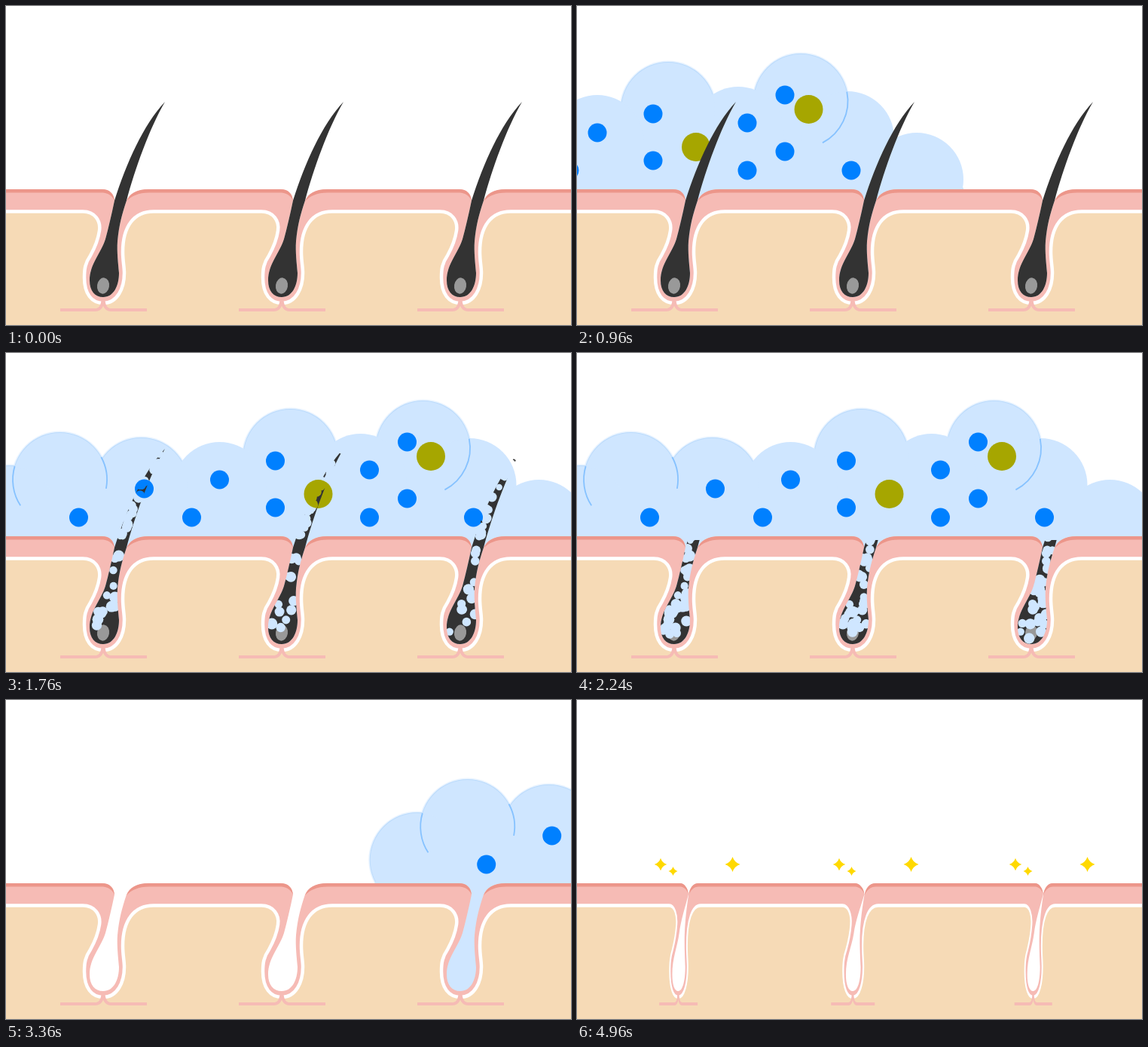
These frames come from a looping animation (750x423 px, 5.12 s). An HTML page with a canvas:

```html
<!DOCTYPE html>
<html lang="en">
<head>
<meta charset="utf-8">
<title>Hair removal foam</title>
<style>
  html, body { margin: 0; width: 100%; height: 100%; overflow: hidden; background: #fff; }
  canvas { display: block; width: 750px; height: 423px; }
</style>
</head>
<body>
<canvas id="stage" width="750" height="423"></canvas>
<script>
const W = 750, H = 423, STEP = 160, LOOP = 5120;
const ctx = document.getElementById('stage').getContext('2d');
const hairLayer = document.createElement('canvas');
hairLayer.width = W;
hairLayer.height = H;
const hctx = hairLayer.getContext('2d');

const PINK = '#f6bbb5', ROSE = '#ec968a', TAN = '#f6dab6';
const FOAM = '#cfe6ff', BLUE = '#0080ff', OLIVE = '#a6a600';
const SPACING = 237, ROOT = 129;

// How far each pore narrows and drifts when it closes; the tile ends at x1.
const pores = [
  { x: 0, squeeze: 0.443, drift: 5.4, x0: -5, x1: 248, stars: 0 },
  { x: SPACING, squeeze: 0.504, drift: 0, x0: 247, x1: 485, stars: 237 },
  { x: 2 * SPACING, squeeze: 0.435, drift: 2.5, x0: 484, x1: 755, stars: 471 }
];

// Foam lobes: x, y, radius, rimmed
const lobes = [
  [126, 126, 63, 1], [188, 175, 62, 0], [280, 230, 62, 0],
  [43, 168, 61, 0], [-50, 137, 63, 1], [-144, 180, 62, 0],
  [-248, 175, 63, 1], [-356, 168, 63, 1], [-423, 212, 63, 1]
];
const blueDots = [
  [105, 118], [55, 155], [105, 193], [55, 218], [193, 218], [-70, 143],
  [-70, 205], [-144, 168], [-181, 218], [-244, 180], [-331, 218]
];
const oliveDots = [[136.5, 137], [-13, 187]];
const creases = [
  [126, 126, -0.2, 1.09], [-356, 168, -0.5, 0.19],
  [-356, 168, Math.PI - 0.58, Math.PI + 0.29]
];

const clamp = v => Math.max(0, Math.min(1, v));

function disc(c, x, y, r, color) {
  c.fillStyle = color;
  c.beginPath();
  c.arc(x, y, r, 0, 2 * Math.PI);
  c.fill();
}

// Pore wall from the left lip round the bulb to the right lip.
function wall(k) {
  return `C${140 + 8 * k} 277 136 294 132 309 C126 328 111 342 111 364
    C111 378 118 386 129 386 C143 386 150 371 150 354
    C149 342 147 326 148 312 C150 290 154 276 160 258`;
}

const hairPath = new Path2D(
  `M211 127 C182 158 160 208 144 258 ${wall(0)} C171 217 190 163 211 127Z`);

function rng(seed) {
  return () => (seed = (seed * 16807) % 2147483647) / 2147483647;
}

// Bubbles that eat the hair: one set above the skin, one inside the pore.
pores.forEach((p, i) => {
  const rand = rng(7919 * (i + 3));
  p.upper = Array.from({ length: 60 }, () => {
    const u = rand();
    return [152 + 59 * u ** 1.35 + 8 * (rand() - 0.5), 250 - 123 * u, 4 + 3 * rand()];
  });
  p.lower = Array.from({ length: 70 }, () => {
    const v = rand() ** 0.75;
    const half = 7 + 10 * clamp((v - 0.4) * 3);
    return [153 - 24 * v ** 0.8 + half * (2 * rand() - 1), 254 + 128 * v, 5 + 2.5 * rand()];
  });
});

function foamShift(n) {
  return n < 16 ? -342 + 85.5 * Math.min(n, 9) : 427.5 + 90.2 * (n - 15);
}

function drawFoam(shift) {
  ctx.save();
  ctx.translate(shift, 0);
  const rimmed = lobes.filter(l => l[3]);
  rimmed.forEach(([x, y, r]) => disc(ctx, x, y, r + 1.5, '#e8f3ff'));
  rimmed.forEach(([x, y, r]) => disc(ctx, x, y, r, '#bbdbfc'));
  lobes.forEach(([x, y, r, rim]) => disc(ctx, x, y, rim ? r - 1 : r, FOAM));
  ctx.fillRect(-479, 241, 821, 154);
  ctx.fillRect(-420, 180, 700, 70);
  ctx.strokeStyle = '#86c2ff';
  ctx.lineWidth = 1.8;
  creases.forEach(([x, y, a, b]) => {
    ctx.beginPath();
    ctx.arc(x, y, 62.5, a, b);
    ctx.stroke();
  });
  blueDots.forEach(([x, y]) => disc(ctx, x, y, 12.5, BLUE));
  oliveDots.forEach(([x, y]) => disc(ctx, x, y, 19, OLIVE));
  ctx.restore();
}

function drawSkin(p, k) {
  const s = 1 - k * (1 - p.squeeze);
  const mid = p.x + ROOT + p.drift * k;
  const a = ROOT + (p.x0 - mid) / s;
  const b = ROOT + (p.x1 - mid) / s;
  const lip = 144 + 15.5 * k, bend = 127 + 8 * k;
  const leftLip = `H${bend} C${bend + 11} 243 ${lip - 1} 249 ${lip} 258`;
  const fill = (path, color) => {
    ctx.fillStyle = color;
    ctx.fill(new Path2D(path));
  };
  const stroke = path => ctx.stroke(new Path2D(path));

  ctx.save();
  ctx.translate(mid, 0);
  ctx.scale(s, 1);
  ctx.translate(-ROOT, 0);

  fill(`M${a} 243 ${leftLip} ${wall(k)} C164 249 173 243 190 243 H${b} V${H} H${a}Z`, PINK);
  fill(`M${a} 243 ${leftLip} C${lip - 4} 250 ${bend + 7} 247.5 ${bend - 1} 247.5 H${a}Z`, ROSE);
  fill(`M160 259 C164 249 173 243 190 243 H${b} V247.5 H190 C176 247.5 166 252 160 259Z`, ROSE);

  const edge = `M${a} 272.5 H102 C118 272.5 126 285 124 298 C122 312 117 322 112 331
    C105 341 104 349 104 360 C104 382 114 394 129 394 C148 394 157 374 157 354
    C157 346 155 338 155 326 C155 292 170 272.5 196 272.5 H${b}`;
  fill(`${edge} V${H} H${a}Z`, TAN);
  ctx.lineWidth = 4.5;
  ctx.strokeStyle = '#fff';
  stroke(edge);
  ctx.lineWidth = 4;
  ctx.strokeStyle = PINK;
  stroke('M72 403 H118 Q128 403 128.5 389');
  stroke('M187 403 H140 Q130 403 129.5 389');
  ctx.restore();
}

function drawHairs(n) {
  const eaten = Math.max(0, n - 9);
  hctx.clearRect(0, 0, W, H);
  for (const p of pores) {
    hctx.save();
    hctx.translate(p.x, 0);
    hctx.fillStyle = '#333';
    hctx.fill(hairPath);
    hctx.fillStyle = '#999';
    hctx.beginPath();
    hctx.ellipse(129, 371, 8, 10.7, 0.15, 0, 2 * Math.PI);
    hctx.fill();
    hctx.globalCompositeOperation = 'destination-out';
    const erase = ([x, y, r]) => disc(hctx, x, y, r, '#000');
    p.upper.slice(0, eaten * 15).forEach(erase);
    p.lower.slice(0, eaten > 5 ? 60 : Math.round(eaten * 6.4)).forEach(erase);
    if (eaten > 4) hctx.fillRect(100, 100, 130, 148);
    hctx.restore();
  }
  ctx.drawImage(hairLayer, 0, 0);
}

function star(x, y, r) {
  const c = r * 0.25;
  ctx.beginPath();
  ctx.moveTo(x, y - r);
  ctx.quadraticCurveTo(x + c, y - c, x + r, y);
  ctx.quadraticCurveTo(x + c, y + c, x, y + r);
  ctx.quadraticCurveTo(x - c, y + c, x - r, y);
  ctx.quadraticCurveTo(x - c, y - c, x, y - r);
  ctx.fill();
}

function drawStars(size) {
  ctx.fillStyle = '#ffd900';
  for (const { stars: x } of pores) {
    star(x + 111, 218, 8.3 * size);
    star(x + 127.5, 227, 6 * size);
    star(x + 206.5, 218, 10 * size);
  }
}

function draw(t) {
  const n = Math.floor((t % LOOP) / STEP);
  const closed = clamp((n - 24) / 4);
  ctx.fillStyle = '#fff';
  ctx.fillRect(0, 0, W, H);
  if (n < 24) drawFoam(foamShift(n));
  pores.forEach(p => drawSkin(p, closed));
  if (n < 16) drawHairs(n);
  if (n > 28) drawStars((n - 28) / 3);
}

let start;
function tick(now) {
  if (start === undefined) start = now;
  draw(now - start);
  requestAnimationFrame(tick);
}
draw(0);
requestAnimationFrame(tick);
</script>
</body>
</html>
```
